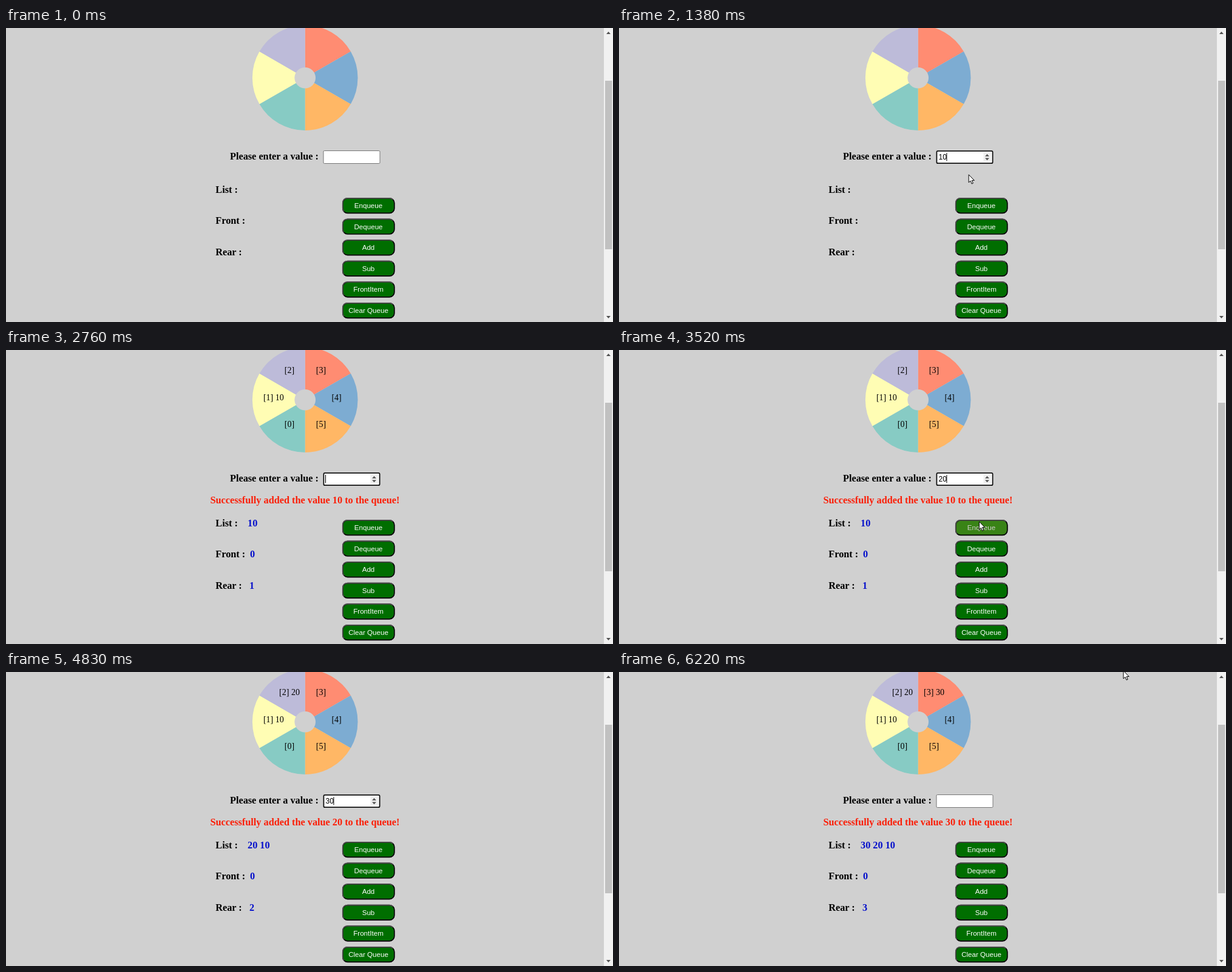
These frames come from a looping animation (1000x485 px, 6410 ms). An HTML page:

```html
<!DOCTYPE html>
<html lang="en">
<head>
<meta charset="utf-8">
<title>Circular queue</title>
<style>
  html, body { margin: 0; width: 100%; height: 100%; overflow: hidden; background: #d0d0d0; }
  svg { display: block; width: 100vw; height: 100vh; }
  text { white-space: pre; }
  .bold { font: bold 16.25px "Liberation Serif", "Times New Roman", serif; }
  .slot { font: 14px "Liberation Serif", "Times New Roman", serif; text-anchor: middle; }
  .button { font: 11.6px "Liberation Sans", Arial, sans-serif; text-anchor: middle; }
  .value { font: 12px "Liberation Sans", Arial, sans-serif; }
  .blue { fill: #0610cb; }
  .red { fill: #fb1e07; }
</style>
</head>
<body>
<svg id="stage" viewBox="0 0 1000 485"></svg>
<script>
const LOOP = 6410;
const stage = document.getElementById('stage');

function add(tag, attrs, content = '', parent = stage) {
  const node = document.createElementNS('http://www.w3.org/2000/svg', tag);
  for (const key in attrs) node.setAttribute(key, attrs[key]);
  node.textContent = content;
  parent.appendChild(node);
  return node;
}
const set = (node, attrs) => { for (const key in attrs) node.setAttribute(key, attrs[key]); };
const write = (node, content) => { if (node.textContent !== content) node.textContent = content; };
const show = (node, on) => node.setAttribute('visibility', on ? 'visible' : 'hidden');
const clamp = x => Math.max(0, Math.min(1, x));
const mix = (a, b, k) => `rgb(${a.map((v, i) => Math.round(v + (b[i] - v) * k))})`;

// Timeline
const enqueues = [[1790, 10], [3720, 20], [5460, 30]];
const focusSpans = [[200, 1690], [2470, 3700], [4300, 5440]];
const hoverSpans = [[1560, 2030], [3480, 3800], [5250, 5575]];
const typing = [
  [0, ''], [1070, '1'], [1100, '10'], [1790, ''],
  [2950, '2'], [3110, '20'], [3720, ''],
  [4450, '3'], [4830, '30'], [5460, '']
];
const trips = [
  [[1250, 566, 214], [1560, 590, 280], [1690, 600, 289], [1970, 600, 289], [2030, 590, 277], [2250, 564, 214]],
  [[3260, 566, 214], [3480, 590, 280], [3600, 600, 289], [3740, 600, 289], [3800, 586, 278],
   [3910, 563, 235], [4000, 563, 235], [4090, 563, 214]],
  [[4950, 566, 214], [5250, 590, 280], [5400, 600, 289], [5540, 600, 289], [6130, 831, -2], [LOOP, 831, -2]]
];

// Wheel
const cx = 492.7, cy = 82.2, radius = 86.8;
const wheelColors = ['#ff8c72', '#7dacd2', '#ffb765', '#87cbc4', '#fffdb4', '#bdbbd9'];
const rim = i => {
  const a = (i * 60 - 90) * Math.PI / 180;
  return `${cx + radius * Math.cos(a)} ${cy + radius * Math.sin(a)}`;
};
wheelColors.forEach((fill, i) =>
  add('path', { d: `M${cx} ${cy}L${rim(i)}A${radius} ${radius} 0 0 1 ${rim(i + 1)}Z`, fill }));
add('circle', { cx, cy, r: 17.3, fill: '#d0d0d0' });
const slots = [[467, 127], [440.8, 82.7], [467, 38], [519, 38], [544.6, 82.7], [519, 127]]
  .map(([x, y]) => add('text', { x, y, class: 'slot' }));

// Form and results
const bold = (x, y, content, extra = '') => add('text', { x, y, class: 'bold ' + extra }, content);
bold(369, 217, 'Please enter a value :');
const box = add('rect', { fill: '#fff' });
const spinner = add('g', {});
add('rect', { x: 600.5, y: 205.5, width: 12.5, height: 15, fill: '#efefef' }, '', spinner);
add('path', { d: 'M603 211.8L606.5 208L610 211.8ZM603 214.4L606.5 218.2L610 214.4Z', fill: '#505050' }, '', spinner);
const typed = add('text', { x: 526.5, y: 217, class: 'value' });
const caret = add('rect', { y: 206, width: 1, height: 13.5 });
const message = bold(336.5, 252.5, '', 'red');
const rows = [['List :', 398, 272], ['Front :', 402, 323], ['Rear :', 401, 374.5]].map(([name, x, y]) =>
  ({ y, label: bold(345.3, y, name), value: bold(x, y + 19, '', 'blue') }));

// Buttons
const buttons = ['Enqueue', 'Dequeue', 'Add', 'Sub', 'FrontItem', 'Clear Queue'].map((name, i) => {
  const g = add('g', { transform: `translate(554 ${280 + i * 34.6})` });
  const face = add('rect', { x: .8, y: .8, width: 85, height: 24.6, rx: 8, fill: '#006e00', stroke: '#000', 'stroke-width': 1.7 }, '', g);
  add('path', { d: 'M3 23Q.8 21 .8 17.4V8.8Q.8 .8 8.8 .8H77.8Q81 .8 83.4 3', fill: 'none', stroke: '#4c4c4c', 'stroke-width': 1.7 }, '', g);
  const label = add('text', { x: 43, y: 17, class: 'button', fill: '#fff' }, name, g);
  return { face, label };
});

// Scrollbar
add('rect', { x: 985, y: 0, width: 15, height: 485, fill: '#f1f1f1' });
add('rect', { x: 987, y: 87, width: 11.5, height: 278, fill: '#c1c1c1' });
add('path', { d: 'M989 10L992.5 6L996 10ZM989 475L992.5 479L996 475Z', fill: '#505050' });

const cursor = add('path', {
  d: 'M0 0V13L3 10.3L5 15.2L7.2 14.2L5.2 9.5H9.2Z', fill: '#fff', stroke: '#000', 'stroke-width': 1
});

const inside = (spans, t) => spans.find(([from, to]) => t >= from && t < to);
const fade = x => 1 - (1 - clamp(x / 300)) ** 2;
const hoverAmount = t => Math.max(...hoverSpans.map(([from, to]) => fade(t - from) * (1 - fade(t - to))));

function pointer(t) {
  const trip = trips.find(p => t >= p[0][0] && t < p[p.length - 1][0]);
  if (!trip) return null;
  const i = trip.findIndex(p => p[0] > t);
  const [t0, x0, y0] = trip[i - 1], [t1, x1, y1] = trip[i];
  const k = (t - t0) / (t1 - t0);
  return { x: x0 + (x1 - x0) * k, y: y0 + (y1 - y0) * k };
}

function render(t) {
  const queue = enqueues.filter(([at]) => t >= at).map(([, value]) => value);
  const filled = queue.length > 0;
  slots.forEach((slot, i) => {
    const value = i > 0 && queue[i - 1];
    write(slot, filled ? `[${i}]${value ? ' ' + value : ''}` : '');
  });
  write(message, filled ? `Successfully added the value ${queue[queue.length - 1]} to the queue!` : '');
  const results = [[...queue].reverse().join(' '), '0', String(queue.length)];
  rows.forEach((row, i) => {
    set(row.label, { y: row.y + (filled ? 19 : 0) });
    write(row.value, filled ? results[i] : '');
  });

  const [keyTime, value] = typing.filter(([at]) => t >= at).pop();
  const focus = inside(focusSpans, t);
  const p = pointer(t);
  const overInput = p && p.x > 522 && p.x < 617 && p.y > 201 && p.y < 224;
  write(typed, value);
  set(box, focus
    ? { x: 523.4, y: 202.8, width: 92.2, height: 20.4, rx: 2, stroke: '#101010', 'stroke-width': 1.8 }
    : { x: 523, y: 202.5, width: 93, height: 21, rx: 1.5, stroke: '#767676', 'stroke-width': 1 });
  show(spinner, focus || overInput);
  set(caret, { x: 526 + value.length * 6.7 });
  show(caret, focus && (t - Math.max(keyTime, focus[0])) % 1000 < 500);

  const hover = hoverAmount(t);
  set(buttons[0].face, { fill: mix([0, 110, 0], [224, 192, 88], hover) });
  set(buttons[0].label, { fill: mix([255, 255, 255], [66, 62, 50], hover) });

  show(cursor, p && !overInput);
  if (p) set(cursor, { transform: `translate(${p.x} ${p.y})` });
}

const start = performance.now();
function tick() {
  render((performance.now() - start) % LOOP);
  requestAnimationFrame(tick);
}
tick();
</script>
</body>
</html>
```
